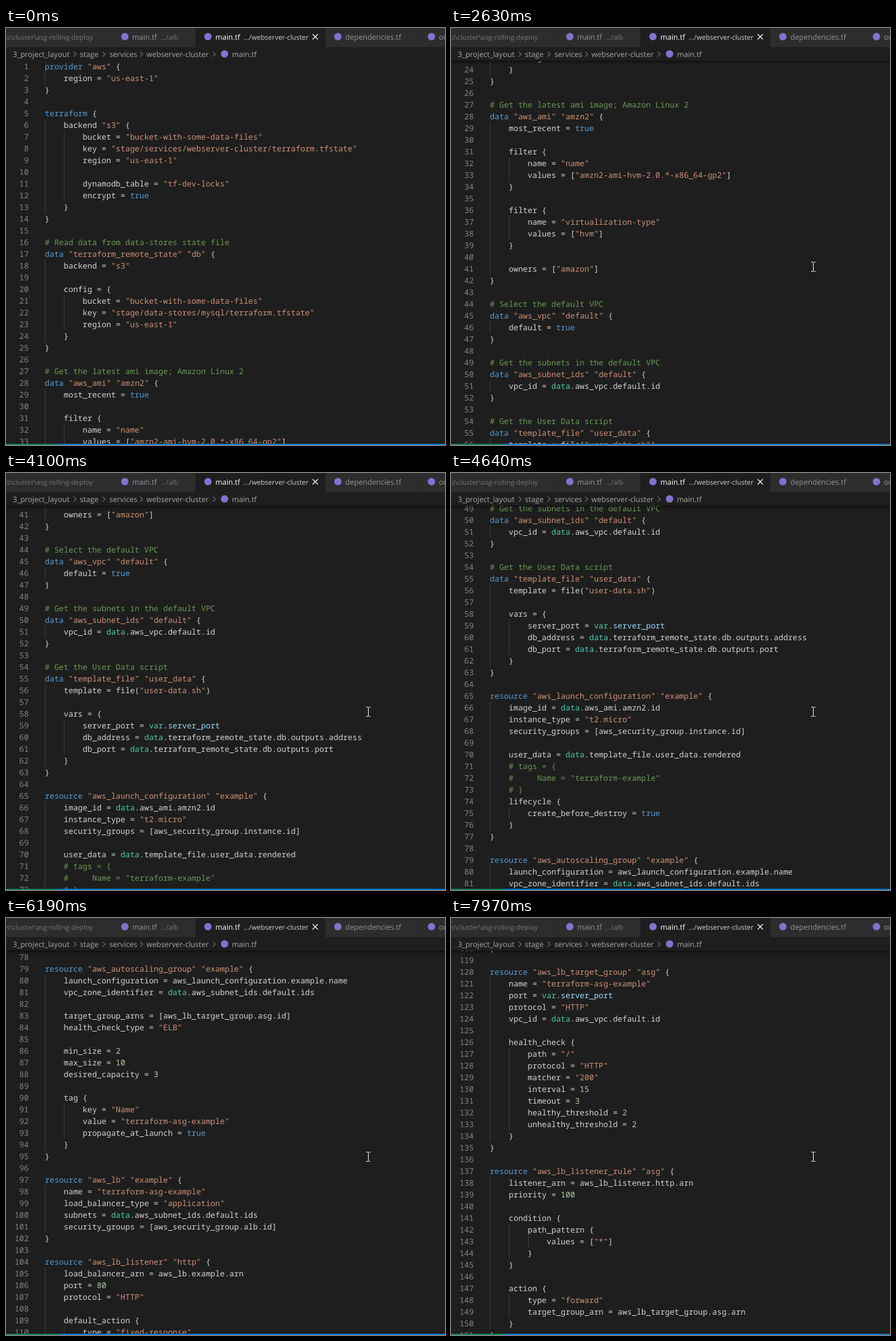
An HTML page that plays this animation: 713 px wide and 676 px high, repeating every 8000 ms.

```html
<!DOCTYPE html>
<html lang="en">
<head>
<meta charset="utf-8">
<title>Editor scroll</title>
<style>
  html, body { margin: 0; width: 100%; height: 100%; overflow: hidden; background: #1e1e1e; }
  #stage { position: relative; width: 713px; height: 676px; overflow: hidden; background: #1e1e1e; text-rendering: geometricPrecision; }
  #stage > * { position: absolute; left: 0; }
  #header { top: 0; font: 12.15px "Open Sans", "Noto Sans", sans-serif; }
  #header .note { font-size: 11.1px; }
  #header .dim { fill: #969696; }
  #header .dim.note { fill: #777; }
  #header .crumb { fill: #a9a9a9; }
  #editor { top: 53px; width: 713px; height: 621px; overflow: hidden; }
  #code { font: 12.828px/19px "Noto Sans Mono", "DejaVu Sans Mono", monospace; color: #d4d4d4; will-change: transform; }
  .row { position: relative; height: 19px; padding-left: 63px; white-space: pre; font-variant-ligatures: none; }
  .row b { position: absolute; left: 0; width: 37px; text-align: right; font-weight: 400; color: #858585; }
  .row i { position: absolute; top: 0; width: 1px; height: 19px; background: #404040; }
  .comment { color: #6a9955; }
  .string { color: #ce9178; }
  .keyword { color: #569cd6; }
  .scope { color: #4ec9b0; }
  .member { color: #9cdcfe; }
  .number { color: #b5cea8; }
  #shadow { top: 53px; width: 713px; height: 6px; box-shadow: #000 0 6px 6px -6px inset; }
  #status { top: 674px; width: 713px; height: 2px; background: linear-gradient(90deg, #16825d 85px, #007acc 85px); }
  #pointer { top: 0; }
</style>
</head>
<body>
<div id="stage">
  <div id="editor"><div id="code"></div></div>
  <div id="shadow"></div>
  <svg id="header" width="713" height="53"></svg>
  <div id="status"></div>
  <svg id="pointer" width="9" height="18" fill="none">
    <path d="M1 1.5H4M5 1.5H8M4.5 2V16M1 16.5H4M5 16.5H8" stroke="#fff"/>
  </svg>
</div>
<script>
const source = `provider "aws" {
    region = "us-east-1"
}

terraform {
    backend "s3" {
        bucket = "bucket-with-some-data-files"
        key = "stage/services/webserver-cluster/terraform.tfstate"
        region = "us-east-1"

        dynamodb_table = "tf-dev-locks"
        encrypt = true
    }
}

# Read data from data-stores state file
data "terraform_remote_state" "db" {
    backend = "s3"

    config = {
        bucket = "bucket-with-some-data-files"
        key = "stage/data-stores/mysql/terraform.tfstate"
        region = "us-east-1"
    }
}

# Get the latest ami image; Amazon Linux 2
data "aws_ami" "amzn2" {
    most_recent = true

    filter {
        name = "name"
        values = ["amzn2-ami-hvm-2.0.*-x86_64-gp2"]
    }

    filter {
        name = "virtualization-type"
        values = ["hvm"]
    }

    owners = ["amazon"]
}

# Select the default VPC
data "aws_vpc" "default" {
    default = true
}

# Get the subnets in the default VPC
data "aws_subnet_ids" "default" {
    vpc_id = data.aws_vpc.default.id
}

# Get the User Data script
data "template_file" "user_data" {
    template = file("user-data.sh")

    vars = {
        server_port = var.server_port
        db_address = data.terraform_remote_state.db.outputs.address
        db_port = data.terraform_remote_state.db.outputs.port
    }
}

resource "aws_launch_configuration" "example" {
    image_id = data.aws_ami.amzn2.id
    instance_type = "t2.micro"
    security_groups = [aws_security_group.instance.id]

    user_data = data.template_file.user_data.rendered
    # tags = {
    #     Name = "terraform-example"
    # }
    lifecycle {
        create_before_destroy = true
    }
}

resource "aws_autoscaling_group" "example" {
    launch_configuration = aws_launch_configuration.example.name
    vpc_zone_identifier = data.aws_subnet_ids.default.ids

    target_group_arns = [aws_lb_target_group.asg.id]
    health_check_type = "ELB"

    min_size = 2
    max_size = 10
    desired_capacity = 3

    tag {
        key = "Name"
        value = "terraform-asg-example"
        propagate_at_launch = true
    }
}

resource "aws_lb" "example" {
    name = "terraform-asg-example"
    load_balancer_type = "application"
    subnets = data.aws_subnet_ids.default.ids
    security_groups = [aws_security_group.alb.id]
}

resource "aws_lb_listener" "http" {
    load_balancer_arn = aws_lb.example.arn
    port = 80
    protocol = "HTTP"

    default_action {
        type = "fixed-response"

        fixed_response {
            content_type = "text/plain"
            message_body = "404: page not found"
            status_code = 404
        }
    }
}

resource "aws_lb_target_group" "asg" {
    name = "terraform-asg-example"
    port = var.server_port
    protocol = "HTTP"
    vpc_id = data.aws_vpc.default.id

    health_check {
        path = "/"
        protocol = "HTTP"
        matcher = "200"
        interval = 15
        timeout = 3
        healthy_threshold = 2
        unhealthy_threshold = 2
    }
}

resource "aws_lb_listener_rule" "asg" {
    listener_arn = aws_lb_listener.http.arn
    priority = 100

    condition {
        path_pattern {
            values = ["*"]
        }
    }

    action {
        type = "forward"
        target_group_arn = aws_lb_target_group.asg.arn
    }
}`;

const byId = id => document.getElementById(id);

// Code rows with line numbers, indent guides and token colours
const tokens = /(?<comment>#.*)|(?<string>"[^"]*")|(?<keyword>^(?:provider|terraform|data|resource)\b|\btrue\b)|(?<scope>\b(?:data|var)(?=\.))|(?<member>(?<=\bvar\.)\w+)|(?<number>\b\d+\b)/g;
const paint = line => line.replace(tokens, (text, ...rest) => {
  const groups = rest.at(-1);
  return `<span class="${Object.keys(groups).find(kind => groups[kind])}">${text}</span>`;
});
const lines = source.split("\n");
const depth = n => lines[n] ? lines[n].search(/\S/) / 4 : Math.min(depth(n - 1), depth(n + 1));
byId("code").innerHTML = lines.map((line, n) => {
  const guides = Array.from({ length: depth(n) }, (_, k) => `<i style="left:${Math.round(63 + k * 30.79)}px"></i>`);
  return `<div class="row"><b>${n + 1}</b>${guides.join("")}${paint(line)}</div>`;
}).join("");

// Tabs and breadcrumbs
const box = (x, width, fill) => `<rect x="${x}" width="${width}" height="31" fill="${fill}"/>`;
const label = (x, y, text, kind) => `<text x="${x}" y="${y}" class="${kind}" fill="#fff">${text}</text>`;
const icon = (x, y) => `<circle cx="${x}" cy="${y}" r="6" fill="#8272cf"/>`;
const chevron = x => `<path d="M${x - 2} 38.5l4 4-4 4" fill="none" stroke="#a9a9a9"/>`;
byId("header").innerHTML = [
  box(0, 713, "#252526"), box(0, 172, "#2d2d2d"), box(173, 134, "#2d2d2d"),
  box(308, 210, "#1e1e1e"), box(519, 151, "#2d2d2d"), box(671, 42, "#2d2d2d"),
  `<rect y="31" width="713" height="22" fill="#1e1e1e"/>`,
  label(1, 19, "s\\cluster\\asg-rolling-deploy", "dim note"),
  icon(193, 14), label(205, 19, "main.tf", "dim"), label(251, 19, ".../alb", "dim note"),
  icon(328, 14), label(340, 19, "main.tf", ""), `<g opacity=".8">${label(386, 19, ".../webserver-cluster", "note")}</g>`,
  `<path d="M498 10l8.500 8.500M506.500 10l-8.500 8.500" stroke="#fff" stroke-width="1.200"/>`,
  icon(539, 14), label(551, 19, "dependencies.tf", "dim"),
  icon(691, 14), label(703, 19, "outputs.tf", "dim"),
  label(11, 47, "3_project_layout", "crumb"), label(120, 47, "stage", "crumb"),
  label(168, 47, "services", "crumb"), label(228, 47, "webserver-cluster", "crumb"),
  [112, 159, 220, 338].map(chevron).join(""),
  icon(355, 42), label(367, 47, "main.tf", "crumb")
].join("");

// Motion: [time, scroll] and [time, x, y]
const LOOP = 8000, TICK = 77.36;
const scrollPath = [[0, 0], [860, 0], [1624, 229], [2630, 432], [3400, 592], [4100, 755], [4796, 963],
  [4874, 963], [5260, 1094], [5730, 1261], [6189, 1462], [7968, 2236], [LOOP, 2236]];
const pointerPath = [[230, 622, 527], [310, 608, 462], [380, 593, 404], [450, 588, 387]];

function scrollAt(time) {
  const k = scrollPath.findIndex(([end]) => end > time);
  const [t0, y0] = scrollPath[k - 1], [t1, y1] = scrollPath[k];
  return Math.round(y0 + (y1 - y0) * (time - t0) / (t1 - t0));
}

function draw() {
  const time = performance.now() % LOOP;
  const scroll = scrollAt(Math.floor((time + 6) / TICK) * TICK);
  byId("code").style.transform = `translateY(${-scroll}px)`;
  byId("shadow").style.visibility = scroll ? "visible" : "hidden";

  const spot = pointerPath.findLast(([start]) => start <= time);
  const pointer = byId("pointer").style;
  pointer.visibility = spot ? "visible" : "hidden";
  if (spot) pointer.transform = `translate(${spot[1] - 4}px, ${spot[2] - 9}px)`;
  requestAnimationFrame(draw);
}
draw();
</script>
</body>
</html>
```
